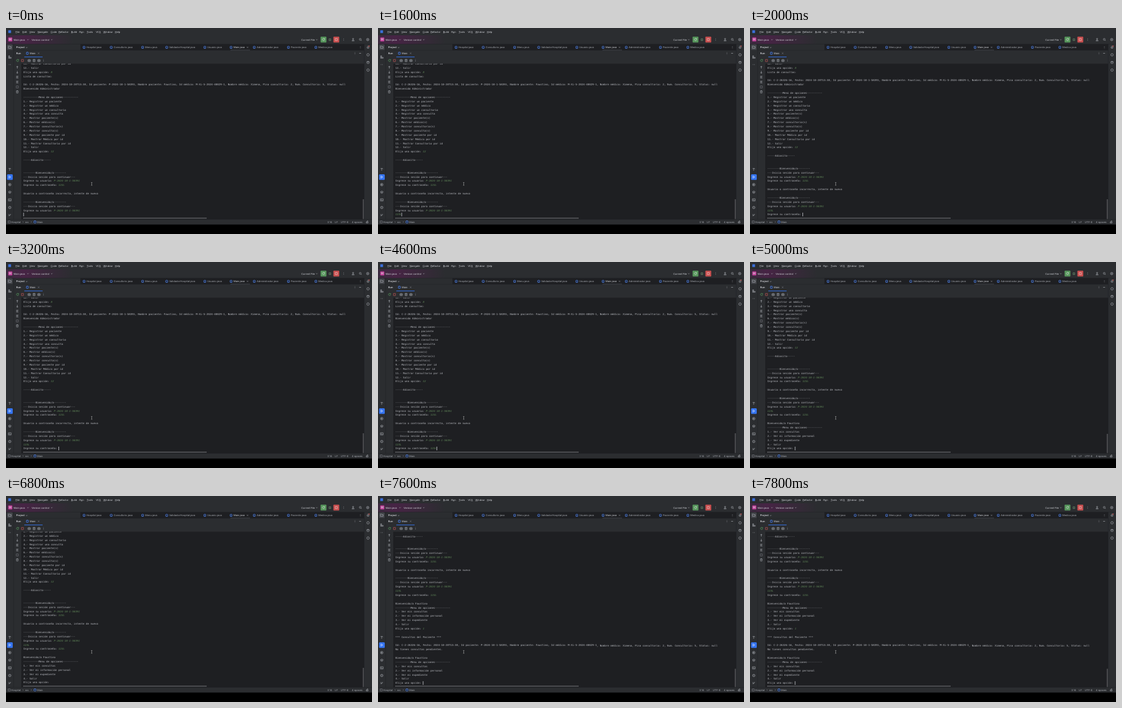
Animation of 600x338 px, one loop 8 s. Source, as an HTML page:

```html
<!DOCTYPE html>
<html lang="es">
<head>
<meta charset="utf-8">
<title>Console session</title>
<style>
  html, body { margin: 0; width: 100%; height: 100%; overflow: hidden; background: #000; }
  svg { display: block; width: 600px; height: 338px; }
  text { white-space: pre; text-rendering: geometricPrecision; font: 4.06px Inter, sans-serif; fill: #d3d5da; }
  .bold { font-weight: 600; }
  .dim { fill: #a8abb2; }
  .u { text-decoration: underline; }
  #console text { font: 4.16px "DejaVu Sans Mono", monospace; fill: #bcbec4; }
  #console .typed { fill: #62895a; font-style: italic; }
</style>
</head>
<body>
<svg viewBox="0 0 600 338">
  <defs>
    <linearGradient id="glow">
      <stop offset="0" stop-color="#3c2a3f"/>
      <stop offset=".25" stop-color="#472445"/>
      <stop offset="1" stop-color="#2b2d30"/>
    </linearGradient>
    <clipPath id="view"><rect x="25" y="58.6" width="560" height="252"/></clipPath>
  </defs>
  <rect width="600" height="322.5" fill="#2b2d30"/>
  <rect y="12" width="110" height="14.5" fill="url(#glow)"/>
  <rect x="122" y="26.5" width="465" height="10" fill="#1e1f22"/>
  <rect x="25" y="58.6" width="562" height="255.4" fill="#1e1f22"/>
  <path d="M0 26.4H600M12.6 26.4V314M587.3 26.4V314M12.6 36.5H587M0 314.1H600" stroke="#1e1f22" stroke-width=".4"/>
  <rect x="368" y="35.7" width="32" height=".8" fill="#4a4d53"/>
  <rect x="30" y="47" width="30" height=".9" fill="#3574f0"/>
  <g id="icons"></g>
  <!-- The tiny rotation keeps text baselines from snapping to whole pixels. -->
  <g id="labels" transform="rotate(.005)"></g>
  <rect x="28" y="311" width="301" height="2" fill="#4b4c4f"/>
  <rect id="thumb" x="584.8" width="2" fill="#4b4c4f"/>
  <g clip-path="url(#view)"><g id="console" transform="rotate(.005)"></g></g>
  <rect id="caret" width=".8" height="6" fill="#ced0d6"/>
  <path d="M139.5 253.5h2M140.5 253.5v4.6M139.5 258.1h2" fill="none" stroke="#d8d8d8" stroke-width=".45"/>
</svg>
<script>
const $ = id => document.getElementById(id);
function add(parent, tag, attrs, content = '') {
  const el = document.createElementNS('http://www.w3.org/2000/svg', tag);
  for (const key in attrs) el.setAttribute(key, attrs[key]);
  el.textContent = content;
  parent.append(el);
  return el;
}

// ---- Window chrome ----
const label = (x, y, s, cls = '') => add($('labels'), 'text', { x, y: y + 1.45, class: cls }, s);
const icon = (x, y, d, color = '#b8bbc1') =>
  add($('icons'), 'path', { d, fill: 'none', stroke: color, 'stroke-width': .6, transform: `translate(${x} ${y})` });
const box = (x, y, size, fill, rx = 1) =>
  add($('icons'), 'rect', { x, y, width: size, height: size, rx, fill });
const dot = (cx, cy, r, fill) => add($('icons'), 'circle', { cx, cy, r, fill });
const shapes = {
  down: 'M-1.1-.5L0 .6 1.1-.5',
  right: 'M-.5-1L.5 0-.5 1',
  close: 'M-1-1L1 1M1-1L-1 1',
  ring: 'M-2 0a2 2 0 1 0 4 0a2 2 0 1 0-4 0',
  folder: 'M-2.2-1.7H-.5L.2-1H2.2V1.8H-2.2Z',
  square: 'M-1.7-1.7H1.7V1.7H-1.7Z',
  play: 'M-1.3-1.8L1.8 0-1.3 1.8Z',
  ringPlay: 'M-2.1 0a2.1 2.1 0 1 0 4.2 0a2.1 2.1 0 1 0-4.2 0M-.6-.9L.9 0-.6.9Z',
  up: 'M0 2V-1.8M-1.4-.4L0-1.8 1.4-.4',
  arrow: 'M0-2V1.8M-1.4.4L0 1.8 1.4.4',
  lines: 'M-1.8-1.5H1.8M-1.8 0H1.2M-1.8 1.5H1.8',
  dots: 'M-1.7 0h.6M-.3 0h.6M1.1 0h.6',
  vdots: 'M0-1.7v.6M0-.3v.6M0 1.1v.6',
  reload: 'M1.6-.9A1.8 1.8 0 1 0 1.8.3M1.8-2V-.7H.5',
  search: 'M-1.8-.4a1.5 1.5 0 1 0 3 0a1.5 1.5 0 1 0-3 0M.9.8L2.1 2',
  bug: 'M-1.1-.8A1.2 1.2 0 0 1 1.1-.8V.8A1.1 1.1 0 0 1-1.1.8ZM-2-1.4L-1.1-.6M2-1.4L1.1-.6M-2 1.7L-1.1 1M2 1.7L1.1 1',
  layers: 'M0-2L2.2-.8 0 .4-2.2-.8ZM-2.2.6L0 1.8 2.2.6',
  blocks: 'M-1.8-1.8H-.2V-.2H-1.8ZM-1.8.6H-.2V2.2H-1.8ZM.6.6H2.2V2.2H.6Z',
  hammer: 'M-1.9-1.6H1.2L2 -.6M-.2-1.6V2.2',
  branch: 'M-1.2-1.8V1.8M1.3-1.8V-.8Q1.3.4-1.2.6',
  person: 'M-1-1.1a1 1 0 1 0 2 0a1 1 0 1 0-2 0M-2 2Q0-.6 2 2Z',
  bell: 'M-1.8 1.2H1.8L1.2.4V-.6A1.2 1.2 0 0 0-1.2-.6V.4ZM-.5 2h1',
  database: 'M-1.7-1.4Q0-2.4 1.7-1.4V1.4Q0 2.4-1.7 1.4ZM-1.7-1.2Q0-.2 1.7-1.2',
  trash: 'M-1.8-1.4H1.8M-1.3-1.4V1.9H1.3V-1.4M-.6-2h1.2',
  camera: 'M-2-1.2H-.9L-.5-1.8H.5L.9-1.2H2V1.7H-2ZM-.7.2a.7.7 0 1 0 1.4 0a.7.7 0 1 0-1.4 0',
  page: 'M-1.5-1.9H1.5V1.9H-1.5ZM-.6-.6H.6M-.6.5H.6',
  terminal: 'M-2.2-1.8H2.2V1.8H-2.2ZM-1.3-.8L-.4 0-1.3.8M.2.8h1.1',
  alert: 'M-2 0a2 2 0 1 0 4 0a2 2 0 1 0-4 0M0-1.1V.3M0 .8v.4',
};
const put = (name, x, y, color) => icon(x, y, shapes[name], color);
function classIcon(x, y) {
  dot(x, y, 2.2, '#548af7');
  dot(x, y, 1.6, '#25324d');
}

// Menu entries: the letter after "_" is the mnemonic.
const menu = { _File: 15.6, _Edit: 27, _View: 38.2, _Navigate: 51.7, _Code: 73.2, _Refactor: 86.2,
  _Build: 106.7, 'R_un': 120.2, _Tools: 132.2, 'VC_S': 147.2, _Window: 159.4, _Help: 178.4 };
for (const name in menu) {
  const [before, rest] = name.split('_');
  const el = label(menu[name], 6.2, before);
  add(el, 'tspan', { class: 'u' }, rest[0]);
  add(el, 'tspan', {}, rest.slice(1));
}
box(3.7, 3.7, 4.6, '#3c6fd8', 0);

box(3.7, 15.5, 6.6, '#c2439b');
label(5.1, 18.9, 'M', 'bold');
label(12.5, 19.2, 'Main.java');
label(42, 19.2, 'Version control');
label(484, 19.2, 'Current File');
for (const x of [36, 75, 509.5]) put('down', x, 19.1);
box(515.7, 14.2, 9.6, '#57965c');
put('reload', 520.5, 19, '#e8efe9');
put('bug', 531, 19, '#79a77d');
box(536.7, 14.2, 9.6, '#c94f4f');
put('square', 541.5, 19, '#f3dede');
put('vdots', 553.5, 19);
put('person', 569, 19);
put('search', 581, 19);
put('ring', 593, 19);
dot(593, 19, .7, '#b8bbc1');

label(16.8, 32, 'Project', 'bold');
put('down', 34, 32);
const tabs = { Hospital: 132, Consultorio: 176.5, Menu: 228, ValidadorHospital: 267.5, Usuario: 330,
  Main: 373, Administrador: 411, Paciente: 467, Medico: 512 };
for (const name in tabs) {
  classIcon(tabs[name] - 4, 31.7);
  label(tabs[name], 31.7, name + '.java', name === 'Main' ? '' : 'dim');
}
put('close', 396, 31.7, '#8b8e95');
put('vdots', 581, 31.7);

label(16.8, 41.5, 'Run', 'bold');
classIcon(35, 41.5);
label(39, 41.5, 'Main');
put('close', 53.5, 41.5, '#8b8e95');
put('vdots', 572, 41.5);
icon(580.5, 41.5, 'M-1.6 0H1.6');

put('reload', 19, 53.3, '#5fad65');
put('square', 27, 53.3, '#db5c5c');
put('camera', 38, 53.3);
put('page', 46, 53.3);
put('camera', 54, 53.3);
put('vdots', 61.5, 53.3);
['up', 'arrow', 'lines', 'lines', 'square', 'trash'].forEach((name, i) =>
  put(name, 18.5, 64.5 + i * 8.05, i === 4 ? '#777a80' : undefined));

box(1.8, 27, 9, '#43454a', 1.5);
put('folder', 6.2, 31.5);
put('blocks', 6.2, 47.5);
put('dots', 6.2, 60);
box(1.7, 239.9, 9.4, '#3574f0', 1.5);
['hammer', 'play', 'ringPlay', 'layers', 'terminal', 'alert', 'branch'].forEach((name, i) =>
  put(name, 6.2, 232 + i * 12.5, i === 1 ? '#fff' : undefined));
['bell', 'ring', 'database', 'ring'].forEach((name, i) => put(name, 593.5, 31.5 + i * 12.5));
dot(595.2, 29.7, .9, '#db5c5c');

put('square', 5.3, 318.3, '#8b8e95');
label(8.6, 318.4, 'Hospital', 'dim');
put('right', 28, 318.3, '#8b8e95');
label(31.5, 318.4, 'src', 'dim');
put('right', 41.5, 318.3, '#8b8e95');
classIcon(47.5, 318.3);
label(51, 318.4, 'Main', 'dim');
label(526.8, 318.4, '3:14', 'dim');
label(539.3, 318.4, 'LF', 'dim');
label(548.8, 318.4, 'UTF-8', 'dim');
label(567, 318.4, '4 spaces', 'dim');
icon(592, 318.3, 'M-1.4-.2H1.4V1.7H-1.4ZM-.2-.2V-1A.8.8 0 0 1 1.6-1', '#b8bbc1');

// ---- Console transcript: "|" separates output from typed input ----
const patient = 'Faustino';
const user = 'P-2024-10-1-58391';
const password = '123L';
const rule = (s, n) => '-'.repeat(n) + s + '-'.repeat(n);
const login = [rule('Bienvenido/a', 8), rule('Inicia sesión para continuar', 3), 'Ingrese su usuario: |' + user];
const prompt = 'Ingrese su contraseña: |';
const choose = 'Elija una opción: |';
const visit = `Id: C-2-26326-16, Fecha: 2024-10-20T13:30, Id paciente: ${user}, Nombre paciente: ${patient}, ` +
  'Id médico: M-Xi-5-2024-40829-1, Nombre médico: Ximena, Piso consultorio: 2, Num. Consultorio: 5, Status: null';
const numbered = items => items.map((s, i) => `${i + 1}.- ${s}`);
const adminMenu = numbered(['Registrar un paciente', 'Registrar un médico', 'Registrar un consultorio',
  'Registrar una consulta', 'Mostrar paciente(s)', 'Mostrar médico(s)', 'Mostrar consultorio(s)',
  'Mostrar consulta(s)', 'Mostrar paciente por id', 'Mostrar Médico por id', 'Mostrar Consultorio por id', 'Salir']);
const patientMenu = ['', 'Bienvenido/a ' + patient, rule('Menu de opciones', 10),
  ...numbered(['Ver mis consultas', 'Ver mi información personal', 'Ver mi expediente', 'Salir'])];
const history = [...adminMenu.slice(-2), choose + '8', 'Lista de consultas:', '', visit,
  'Bienvenido Administrador', '', rule('Menú de opciones', 10), ...adminMenu, choose + '12', '',
  rule('Adiosito', 5), '', '', ...login, prompt + password, '',
  'Usuario o contraseña incorrecta, intente de nuevo', '', ...login];
const afterLogin = [...history, '|' + password, prompt + password, ...patientMenu];
const afterVisit = [...afterLogin, choose + '1', '', '*** Consultas del Paciente ***', '', visit,
  'No tienes consultas pendientes.', ...patientMenu];

// Each stage: when it starts, finished lines, current line, keys typed at given times.
const stages = [
  { at: 0, lines: history, line: '|', text: password, keys: [600, 800, 1000, 1200], thumb: 281 },
  { at: 2000, lines: [...history, '|' + password], line: prompt, text: password, keys: [3800, 4000, 4200, 4400], thumb: 281 },
  { at: 4900, lines: afterLogin, line: choose, text: '1', keys: [7000], thumb: 282 },
  { at: 7400, lines: afterVisit, line: choose, text: '', keys: [], thumb: 283.5, shift: .9 },
];
const LOOP = 8000, LEFT = 28.5, PITCH = 6.875, BOTTOM = 306, ADVANCE = 2.504, BLINK = 500;
let shown = '';

function render(stage, typed) {
  const lines = [...stage.lines, stage.line + stage.text.slice(0, typed)].slice(-37);
  const bottom = BOTTOM + (stage.shift || 0);
  $('console').replaceChildren();
  lines.forEach((line, i) => {
    const [output, input = ''] = line.split('|');
    const y = bottom - (lines.length - 1 - i) * PITCH + 1.45;
    const row = add($('console'), 'text', { x: LEFT, y }, output);
    if (input) add(row, 'tspan', { class: 'typed' }, input);
  });
  $('caret').setAttribute('x', LEFT + (lines.at(-1).length - 1) * ADVANCE);
  $('caret').setAttribute('y', bottom - 3);
  $('thumb').setAttribute('y', stage.thumb);
  $('thumb').setAttribute('height', 313.5 - stage.thumb);
}

function draw(t) {
  const index = stages.findLastIndex(s => s.at <= t);
  const stage = stages[index];
  const pressed = stage.keys.filter(k => k <= t);
  const state = index + ':' + pressed.length;
  if (state !== shown) render(stage, pressed.length);
  shown = state;
  const since = t - (pressed.at(-1) ?? stage.at);
  $('caret').style.opacity = Math.floor(since / BLINK) % 2 ? 0 : 1;
}

const start = performance.now();
function frame(now) {
  draw(Math.max(0, now - start) % LOOP);
  requestAnimationFrame(frame);
}
frame(start);
</script>
</body>
</html>
```
